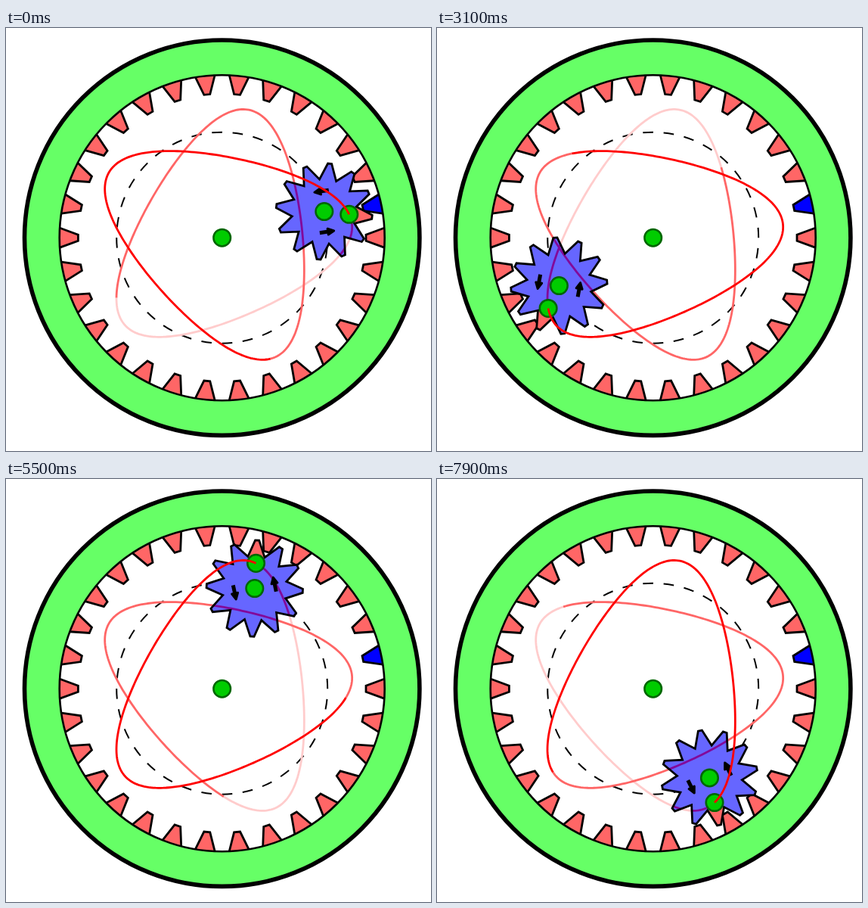
An HTML page with a canvas that plays this animation: 562x559 px, repeating every 8000 ms.

```html
<!DOCTYPE html>
<html>
<head>
<meta charset="utf-8">
<title>Hypotrochoid gear</title>
<style>
html, body { margin: 0; width: 100%; height: 100%; overflow: hidden; background: #fff; }
canvas { display: block; }
</style>
</head>
<body>
<canvas id="stage" width="562" height="559"></canvas>
<script>
const g = document.getElementById('stage').getContext('2d');
const CX = 285.7, CY = 277.2, ORBIT = 139.5, PEN = 33.2;
const STEP = 5.4, TAU = 2 * Math.PI;
const rad = d => d * Math.PI / 180;
const polar = (r, d, x = 0, y = 0) => [x + r * Math.cos(rad(d)), y + r * Math.sin(rad(d))];
const spin = a => -15 - 1.5 * a;   // 30-tooth ring, 12-tooth pinion
const hub = a => polar(ORBIT, a, CX, CY);
const pen = a => polar(PEN, spin(a), ...hub(a));

function paint(fill, stroke, width) {
  if (fill) { g.fillStyle = fill; g.fill(); }
  if (stroke) { g.strokeStyle = stroke; g.lineWidth = width; g.stroke(); }
}

function path(points, close) {
  g.beginPath();
  points.forEach(p => g.lineTo(...p));
  if (close) g.closePath();
}

function circle(x, y, r, fill, stroke, width) {
  g.beginPath();
  g.arc(x, y, r, 0, TAU);
  paint(fill, stroke, width);
}

const dot = p => circle(...p, 11.3, '#0c0', '#060', 2.5);

function turned(x, y, deg, draw) {
  g.save();
  g.translate(x, y);
  g.rotate(rad(deg));
  draw();
  g.restore();
}

function ring() {
  circle(CX, CY, 261.2, '#6f6', '#000', 5.6);
  circle(CX, CY, 215, '#fff');
  for (let i = 0; i < 30; i++) {
    turned(CX, CY, i * 12, () => {
      path([[214.5, -12.9], [190.3, -4], [190.3, 4], [214.5, 12.9]]);
      paint(i === 29 ? '#00f' : '#f66', '#000', 2.8);
    });
  }
  circle(CX, CY, 215, null, '#000', 2.6);
  const dash = TAU * ORBIT / 64;
  g.setLineDash([dash, dash]);
  g.lineDashOffset = dash;
  circle(CX, CY, ORBIT, null, '#000', 2);
  g.setLineDash([]);
}

function arrow() {
  g.lineJoin = 'round';
  path([[27, 10], [27, -3]]);
  paint(null, '#000', 5);
  path([[23, -1], [27, -9], [31, -1]], true);
  paint('#000', '#000', 3);
}

const outline = [];
for (let d = 0; d < 360; d += 30) {
  outline.push(polar(43, d - 15), polar(63.7, d - 2.3), polar(63.7, d + 2.3));
}

function trail(from, to, color) {
  const points = [];
  for (let a = from; a < to; a += 1.5) points.push(pen(a));
  points.push(pen(to));
  path(points);
  paint(null, color, 2.8);
}

function pinion(a) {
  const place = draw => turned(...hub(a), spin(a), draw);
  place(() => {
    path(outline, true);
    paint('#66f');
    path(outline.slice(0, 4), true);
    paint('#f66');
    path(outline, true);
  });
  // older trail shows purple through the gear
  g.save();
  g.clip();
  trail(a - 720, a - 51 * STEP, '#820a9b');
  g.restore();
  place(() => {
    path(outline, true);
    paint(null, '#000', 2.8);
    for (const d of [75, 255]) turned(0, 0, d, arrow);
  });
}

function draw(now) {
  const n = Math.floor(now % 8000 / 100);
  // the cycle skips one step part way through
  const a = -14.4 + STEP * (n + (n > 50));
  const mid = a - 51 * STEP, old = a - 101 * STEP;
  g.clearRect(0, 0, 562, 559);
  ring();
  trail(a - 720, old, '#fcc');
  trail(old, mid, '#f66');
  pinion(a);
  dot([CX, CY]);
  dot(hub(a));
  dot(pen(a));
  trail(mid, a, '#f00');
}

const start = performance.now();
function tick() {
  draw(performance.now() - start);
  requestAnimationFrame(tick);
}
tick();
</script>
</body>
</html>
```
